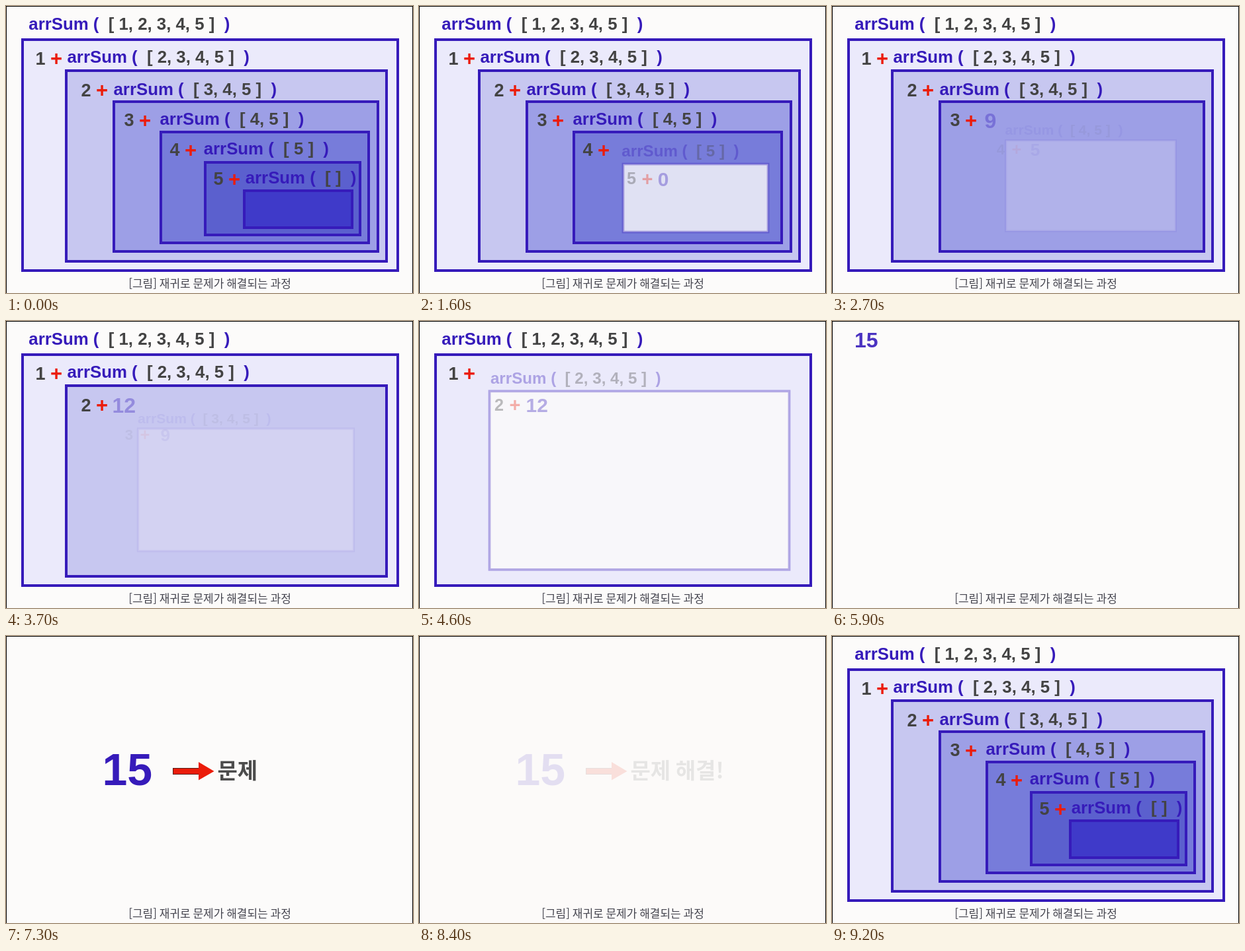
An HTML page with a canvas for the animation above (9300 ms loop, 615 px wide and 435 px high).

```html
<!DOCTYPE html>
<html lang="ko">
<head>
<meta charset="utf-8">
<style>
  html, body { margin: 0; width: 100%; height: 100%; overflow: hidden; background: #fcfbfa; }
  canvas { display: block; }
</style>
</head>
<body>
<canvas id="stage" width="615" height="435"></canvas>
<script>
const ctx = document.getElementById('stage').getContext('2d');
const LOOP = 9300, STEP = 100;
const PAPER = '#fcfbfa', PURPLE = '#361bba', GREY = '#434343', RED = '#eb1c0a';
const LATIN = '"Liberation Sans", Arial, sans-serif';
const KOREAN = '"Noto Sans CJK KR", "Noto Sans CJK", sans-serif';

// One entry per recursive call: text origin, box edges, box fill, returned sum.
const calls = [
  { x: 34.3,  y: 36,    box: [23, 49, 594, 403],  fill: '#ebeafb', sum: 15 },
  { x: 92.5,  y: 86,    box: [89, 96, 577, 389],  fill: '#c7c7f0', sum: 14 },
  { x: 162.5, y: 134.5, box: [161, 143, 564, 374], fill: '#9d9fe6', sum: 12 },
  { x: 232.5, y: 180,   box: [232, 189, 550, 361], fill: '#777cda', sum: 9 },
  { x: 298.7, y: 225,   box: [299, 235, 537, 349], fill: '#5b60ce', sum: 5 },
  { x: 361.7, y: 269,   box: [358, 278, 525, 338], fill: '#3f3ac9', sum: 0 }
];
const terms = [[76, 79], [145, 127], [210, 172.5], [279, 217.5], [345, 261.5]];

calls.forEach((call, i) => {
  call.start = i ? 200 + 1000 * (5 - i) : 5300;
  call.args = ['[', [1, 2, 3, 4, 5].slice(i).join(', '), ']'].filter(Boolean).join(' ');
});

const progress = (t, start, length) => Math.min(1, Math.max(0, (t - start) / length));
const smooth = p => p * p * (3 - 2 * p);
const leaving = (t, call) => progress(t, call.start, 520);
const arriving = (t, call) => smooth(progress(t, call.start + 400, 250));
const fadeOut = p => 1 - p ** 1.6;
const shrink = p => 1 - 0.22 * p ** 4.7;

function text(str, x, y, size, color, align = 'left', family = LATIN, weight = 'bold') {
  ctx.font = `${weight} ${size}px ${family}`;
  ctx.textAlign = align;
  ctx.fillStyle = color;
  ctx.fillText(str, x, y);
  return x + ctx.measureText(str).width;
}

function scaled(cx, cy, scale, alpha, draw) {
  if (alpha <= 0) return;
  ctx.save();
  ctx.translate(cx, cy);
  ctx.scale(scale, scale);
  ctx.translate(-cx, -cy);
  ctx.globalAlpha = alpha;
  draw();
  ctx.restore();
}

function drawCall(call, p) {
  const [l, t, r, b] = call.box, alpha = fadeOut(p);
  scaled((l + r) / 2, (call.y - 19 + b) / 2, shrink(p), alpha, () => {
    const rect = [l + 2, t + 2, r - l - 4, b - t - 4];
    // The panel washes out to paper before it disappears.
    ctx.globalAlpha = 1 - p ** 6;
    ctx.fillStyle = PAPER;
    ctx.fillRect(...rect);
    ctx.globalAlpha = Math.max(0, 1 - p / 0.77);
    ctx.fillStyle = call.fill;
    ctx.fillRect(...rect);
    ctx.globalAlpha = alpha;
    ctx.strokeStyle = PURPLE;
    ctx.lineWidth = 4;
    ctx.strokeRect(...rect);
    let x = text('arrSum (  ', call.x, call.y, 25.8, PURPLE);
    x = text(call.args, x, call.y, 25.8, GREY);
    text('  )', x, call.y, 25.8, PURPLE);
  });
}

function drawTerm(i, p) {
  const [x, y] = terms[i], scale = shrink(p), alpha = fadeOut(p);
  scaled(x - 24, y, scale, alpha, () => text(i + 1, x - 24, y + 9.5, 27, GREY, 'center'));
  scaled(x, y, scale, alpha, () => text('+', x, y + 11, 31, RED, 'center'));
}

function drawSum(call, alpha, p) {
  const x = call.x - 2, y = call.y + 4.5;
  scaled(x + 17, y - 11, shrink(p), alpha * fadeOut(p), () => text(call.sum, x, y, 32, PURPLE));
}

function drawCalls(t) {
  calls.forEach((call, i) => {
    const p = leaving(t, call);
    drawCall(call, p);
    if (i < 5) drawTerm(i, p);
    if (i) drawSum(call, arriving(t, call), leaving(t, calls[i - 1]));
  });
}

function wipe(left, right, p, draw) {
  ctx.save();
  ctx.beginPath();
  ctx.rect(left, 170, (right - left) * p, 70);
  ctx.clip();
  draw();
  ctx.restore();
}

function drawArrow() {
  ctx.fillStyle = RED;
  ctx.strokeStyle = '#5a1a14';
  ctx.lineWidth = 1;
  ctx.fillRect(252, 200, 40, 10);
  ctx.strokeRect(252.5, 200.5, 39, 9);
  ctx.beginPath();
  ctx.moveTo(291, 191);
  ctx.lineTo(314.5, 205);
  ctx.lineTo(291, 218.5);
  ctx.fill();
}

function drawAnswer(t) {
  const move = smooth(progress(t, 6200, 500));
  const mix = (a, b) => a + (b - a) * move;
  ctx.globalAlpha = arriving(t, calls[0]);
  text(15, mix(34, 145.5), mix(40.3, 225.5), mix(32, 68), PURPLE);
  ctx.globalAlpha = 1;
  wipe(251, 315, progress(t, 6750, 300), drawArrow);
  wipe(320, 461, progress(t, 7080, 530), () =>
    text('문제 해결!', 319.5, 215.5, 33, '#4c4c4c', 'left', KOREAN));
}

function veil(alpha) {
  ctx.globalAlpha = alpha;
  ctx.fillStyle = PAPER;
  ctx.fillRect(0, 0, 615, 435);
  ctx.globalAlpha = 1;
}

function draw(t) {
  veil(1);
  if (t < 8900) {
    drawCalls(t);
    drawAnswer(t);
    veil(progress(t, 7700, 800));
  } else {
    drawCalls(0);
    veil(1 - progress(t, 8900, 300));
  }
  text('[그림] 재귀로 문제가 해결되는 과정', 308, 427, 17, '#45454f', 'center', KOREAN, 'normal');
  ctx.fillStyle = '#000';
  ctx.fillRect(0, 0, 615, 1);
  ctx.fillRect(0, 0, 1, 435);
  ctx.fillRect(614, 0, 1, 435);
}

const begin = performance.now();
function tick() {
  const t = (performance.now() - begin) % LOOP;
  draw(Math.floor(t / STEP) * STEP);
  requestAnimationFrame(tick);
}
tick();
</script>
</body>
</html>
```
